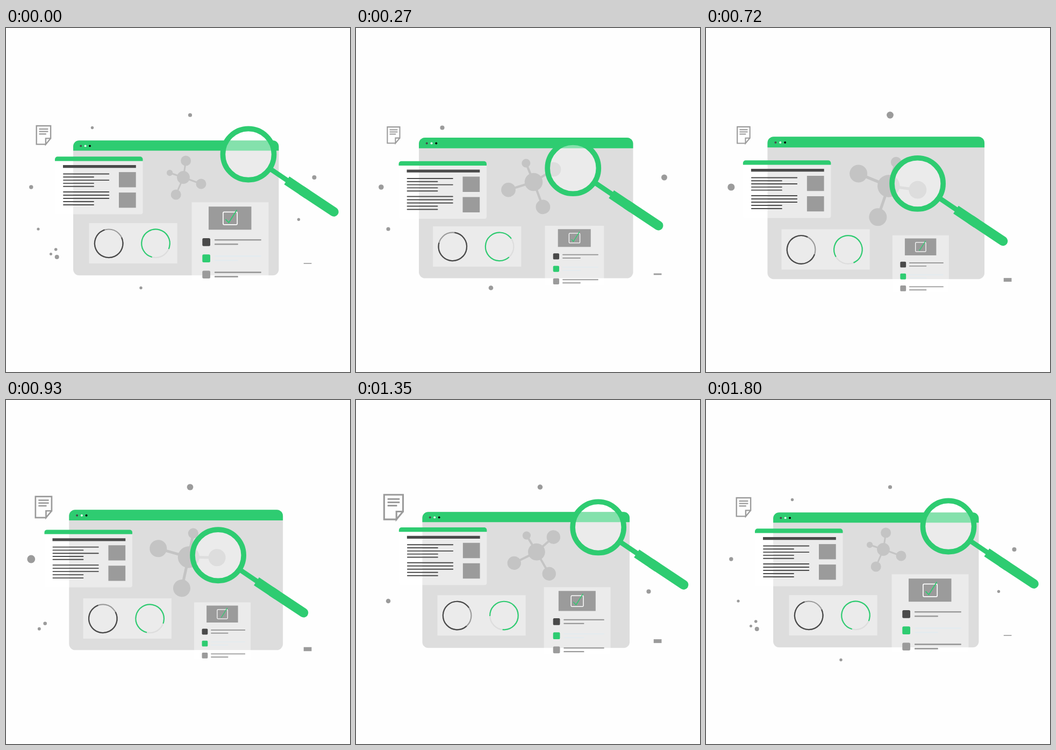
These frames come from a looping animation (640x640 px, 1.83 s). An HTML page with a canvas:

```html
<!DOCTYPE html>
<html lang="en">
<head>
<meta charset="utf-8">
<title>Search dashboard</title>
<style>
html, body { margin: 0; width: 100%; height: 100%; overflow: hidden; background: #fff; }
canvas { display: block; width: 640px; height: 640px; }
</style>
</head>
<body>
<canvas id="stage" width="640" height="640"></canvas>
<script>
const ctx = document.getElementById('stage').getContext('2d');
const LOOP = 1830, STEP = 30, CYCLE = 1800;
const GREEN = '#2ecc71', DARK = '#4a4a4a', MID = '#9b9b9b', PALE = '#dddddd';
const NODE = '#c4c4c4', FAINT = '#e4ebef', GLASS = 'rgba(255,255,255,0.41)';
const RAD = Math.PI / 180;

const mod = (a, n) => ((a % n) + n) % n;
const clamp = u => Math.min(1, Math.max(0, u));
const mix = (a, b, u) => a + (b - a) * u;
const smooth = u => u * u * (3 - 2 * u);

// Smooth step; bend above 1 front-loads the move, below 1 delays it.
const ease = (u, bend = 1) => 1 - (1 - smooth(clamp(u))) ** bend;

// Goes 0 to 1 until `up`, rests until `hold`, returns to 0 at `end`.
function swing(t, up, hold, end, bendUp = 1, bendDown = 1) {
  return ease(t / up, bendUp) - ease((t - hold) / (end - hold), bendDown);
}

// Periodic smooth curve through a few [time, value] poses.
function track(...poses) {
  const n = poses.length;
  const time = i => poses[mod(i, n)][0] + Math.floor(i / n) * CYCLE;
  const value = i => poses[mod(i, n)][1];
  const slope = i => (value(i + 1) - value(i)) / (time(i + 1) - time(i));
  const tangent = i => {
    const a = slope(i - 1), b = slope(i);
    return a * b > 0 ? 2 * a * b / (a + b) : 0;
  };
  return t => {
    let i = n - 1;
    while (time(i) > t) i--;
    const d = time(i + 1) - time(i), u = (t - time(i)) / d, v = 1 - u;
    return mix(value(i), value(i + 1), smooth(u))
      + d * u * v * (tangent(i) * v - tangent(i + 1) * u);
  };
}

const cardX = track([0, 91], [540, 68], [1170, 75.3]);
const cardY = track([0, 239.3], [450, 251.4], [930, 241.4], [1530, 236.4]);
const hubX = track([0, 330], [270, 330.5], [540, 339.5], [900, 339.8], [1530, 333.7]);
const pageSize = track([0, 1], [560, 0.81], [1220, 1.37]);

function rect(x, y, w, h, color, r = 0) {
  ctx.fillStyle = color;
  ctx.beginPath();
  ctx.roundRect(x, y, w, h, r);
  ctx.fill();
}

function disc(x, y, r, color) {
  ctx.fillStyle = color;
  ctx.beginPath();
  ctx.arc(x, y, r, 0, 7);
  ctx.fill();
}

function ring(x, y, r, width, color, from = 0, to = 360) {
  ctx.strokeStyle = color;
  ctx.lineWidth = width;
  ctx.lineCap = 'butt';
  ctx.beginPath();
  ctx.arc(x, y, r, from * RAD, to * RAD);
  ctx.stroke();
}

function line(points, width, color, cap = 'butt') {
  ctx.strokeStyle = color;
  ctx.lineWidth = width;
  ctx.lineCap = cap;
  ctx.beginPath();
  points.forEach(([x, y]) => ctx.lineTo(x, y));
  ctx.stroke();
}

function place(x, y, scale, draw) {
  ctx.save();
  ctx.translate(x, y);
  ctx.scale(scale, scale);
  draw();
  ctx.restore();
}

// Dots shrink towards the loop point and grow away from it.
const dots = [
  { x: 342.5, y: 162, r: 3.6, grow: 2.6, on: 520, off: 110 },
  { x: 160.5, y: 185.5, r: 2.7, grow: 5, on: 1350, off: 600 },
  { x: 46.8, y: 296, r: 3.7, grow: 4, on: 1650, off: 1080 },
  { x: 251, y: 483.5, r: 2.7, grow: 6, on: 1610, off: 400 },
  { x: 573.5, y: 278, r: 4, grow: 5.5, on: 1350, off: 600 },
  { x: 60, y: 374, r: 2.6, grow: 3.7, on: 1140, off: 400 },
  { x: 544.5, y: 356.3, r: 2.7, grow: 3, on: 1080, off: 120 }
];

function dot(t, { x, y, r, grow = 0, on, off }) {
  const age = mod(t - on, CYCLE);
  if (age >= mod(off - on, CYCLE)) return;
  const gap = t < off ? t : CYCLE - t;
  ctx.globalAlpha = Math.min(1, age / 60);
  disc(x, y, r + grow * gap / 1000, MID);
  ctx.globalAlpha = 1;
}

function drawDots(t) {
  dots.forEach(d => dot(t, d));
  const s = swing(t, 540, 930, 1800);
  place(92.7 - 20 * s, 412 + 3.7 * s, 1 + 0.18 * s, () => {
    const pair = [{ x: 0, y: 0, r: 2.8 }, { x: -9.2, y: 8.5, r: 2.5 }];
    pair.forEach((d, i) => {
      dot(t, { ...d, on: 1523 + 17 * i, off: 120 });
      dot(t, { ...d, on: 780, off: 1060 });
    });
    const big = { x: 2, y: 14, r: 4 };
    dot(t, { ...big, on: 1503, off: 120 });
    dot(t, { ...big, on: 420, off: 700 });
  });
  const h = 1.6 + 5.9 * swing(t, 900, 1260, 1800);
  const y = 438 + 32.2 * swing(t, 540, 540, 1800, 1.4, 0.9);
  rect(553.8, y - h / 2, 14.7, h, MID);
}

function drawPage(t) {
  place(69.9, 199.2, pageSize(t), () => {
    const w = 13.2, h = 17.2, fold = [4, h];
    line([fold, [-w, h], [-w, -h], [w, -h], [w, 6.2], fold, [4, 6.2], [w, 6.2]], 2.35, MID, 'square');
    for (let i = 0; i < 3; i++) {
      const y = -11.2 + 4.6 * i;
      line([[-8.4, y], [i < 2 ? 8.5 : 4.9, y]], 2.3, MID);
    }
  });
}

function drawWindow(t) {
  place(316.25, 334.7, 1 + 0.061 * swing(t, 540, 540, 1800, 1.7, 1.6), () => {
    rect(-191.2, -125.5, 382.4, 251, PALE, 11);
    rect(-191.2, -125.5, 382.4, 19, GREEN, [11, 11, 0, 0]);
    [DARK, '#fff', '#000'].forEach((c, i) => disc(-177 + i * 8.4, -115.3, 1.9, c));
  });
}

function drawCard(t) {
  place(cardX(t), cardY(t), 1, () => {
    rect(0, 8, 163.5, 99.2, GLASS, [0, 0, 4, 4]);
    rect(0, 0, 163.5, 8.2, GREEN, [5, 5, 0, 0]);
    rect(15, 15.8, 135.8, 5.2, DARK);
    for (let i = 0; i < 5; i++) {
      const row = (y, long) => line([[16, y], [long ? 100.3 : 72, y]], 1.9, DARK, 'round');
      row(32.2 + 5.8 * i, i === 0 || i === 2);
      row(65.7 + 6 * i, i < 3);
    }
    rect(119, 28.8, 31.7, 28.3, MID);
    rect(119, 66.8, 31.7, 28.3, MID);
  });
}

function drawCharts(t) {
  const turns = t < 900 ? ease(t / 900) ** 1.2 : 1 + ease((t - 900) / 900, 2.3);
  const gauge = (x, base, color, gap) => {
    const from = gap - 360 * turns;
    ring(x, 37.8, 26.3, 2.2, base);
    ring(x, 37.8, 26.3, 2.2, color, from + 41, from + 319);
  };
  const x = 154.5 - 15.2 * swing(t, 540, 540, 1800, 2, 1.3);
  const y = 363 + 14 * swing(t, 540, 540, 1800, 0.8, 3.3);
  place(x, y, 1, () => {
    rect(0, 0, 164.2, 75, GLASS);
    gauge(36.7, MID, DARK, -66);
    gauge(124, PALE, GREEN, 64);
  });
}

function drawNodes(t) {
  const peak = 720, quarter = Math.PI / 2;
  const p = t < peak ? Math.sin(quarter * t / peak)
    : Math.cos(quarter * (t - peak) / (CYCLE - peak)) ** 1.6;
  const y = 278 + 16 * swing(t, peak, peak, 1530, 2, 0.6);
  place(hubX(t), y, 1 + 0.74 * p, () => {
    ctx.rotate(89 * p * RAD);
    [[4.6, -31, 9.5], [33, 12, 9.5], [-13.8, 32, 9.5], [-25.4, -8.5, 5.7]].forEach(([x, y, r]) => {
      line([[0, 0], [x, y]], 3, NODE);
      disc(x, y, r, NODE);
    });
    disc(0, 0, 11.9, NODE);
  });
}

function drawList(t) {
  const s = 1 - 0.265 * swing(t, 540, 900, 1800, 3);
  const x = 417 - 18.7 * swing(t, 540, 540, 1800, 1.2);
  const y = 324.3 + 64.2 * swing(t, 540, 540, 1800, 1.65, 0.8);
  place(x - 71.5 * s, y, s, () => {
    rect(0, 0, 143, 144, GLASS);
    rect(31.5, 8, 79.5, 43, MID);
    ctx.strokeStyle = '#fff';
    ctx.lineWidth = 1.7;
    ctx.beginPath();
    ctx.roundRect(58.4, 18.1, 26.3, 23.4, 2);
    ctx.stroke();
    const cut = 0.9 * swing(t, 930, 930, 1170);
    line([[mix(63, 69, cut), mix(31.7, 37.8, cut)], [69, 37.8], [84, 14.2]], 1.8, GREEN);
    [[DARK, MID], [GREEN, FAINT], [MID, MID]].forEach(([box, text], i) => {
      const top = 66.7 + i * 30.2;
      rect(19.8, top, 14.7, 14.7, box, 2.5);
      rect(42.4, top + 1.9, 87, 2.6, text, 1);
      rect(42.4, top + 9.9, 44, 2.6, text, 1);
    });
  });
}

function drawLens(t) {
  const x = 451 - 57.4 * swing(t, 540, 900, 1440, 2.5, 2);
  const y = 235 + 54.4 * swing(t, 540, 900, 1440, 0.92, 1.3);
  place(x, y, 1, () => {
    disc(0, 0, 44, GLASS);
    line([[39, 26], [76, 51]], 9.2, GREEN);
    line([[71.4, 48.6], [110, 74.5]], 17.6, GREEN);
    line([[100, 67.8], [159, 107]], 17.6, GREEN, 'round');
    ring(0, 0, 47.6, 9.6, GREEN);
  });
}

function frame(now) {
  const t = Math.floor((now % LOOP) / STEP) * STEP % CYCLE;
  rect(0, 0, 640, 640, '#fefefe');
  [drawDots, drawPage, drawWindow, drawCard, drawCharts, drawNodes, drawList, drawLens]
    .forEach(draw => draw(t));
}

const start = performance.now();
function tick() {
  frame(performance.now() - start);
  requestAnimationFrame(tick);
}
tick();
</script>
</body>
</html>
```
